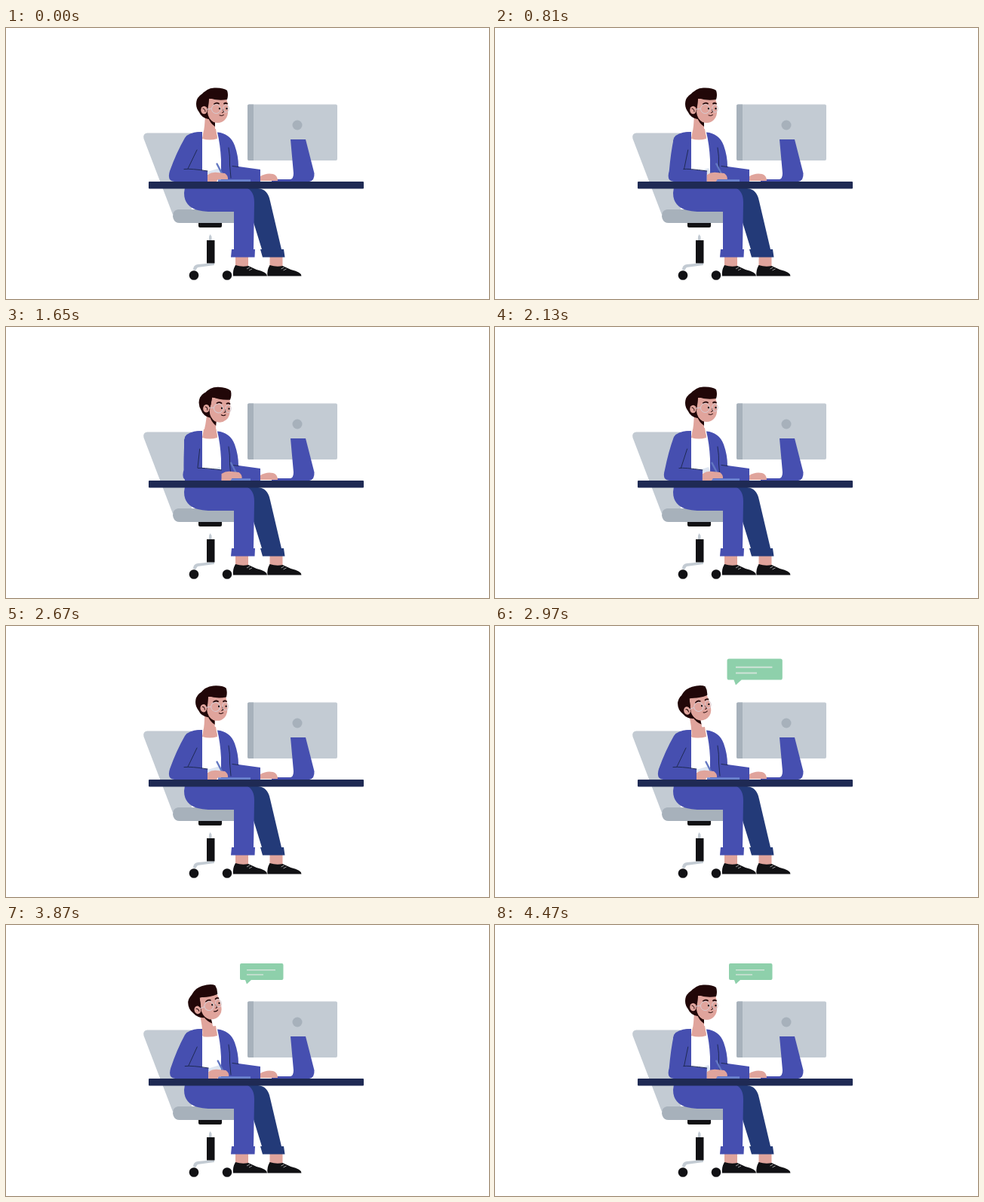
An HTML page that plays this animation: 640 px wide and 360 px high, repeating every 4500 ms.

```html
<!DOCTYPE html>
<html lang="en">
<head>
<meta charset="utf-8">
<title>Working at a desk</title>
<style>
  html, body { margin: 0; width: 100%; height: 100%; overflow: hidden; background: #fff; }
  svg { display: block; width: 100vw; height: 100vh; }
  .jacket { fill: #464fb0; }
  .navy { fill: #233a78; }
  .skin { fill: #e0a49c; }
  .hair { fill: #210708; }
  .black { fill: #111114; }
  .light { fill: #c3cbd3; }
  .grey { fill: #a7b1bb; }
  .line { fill: none; stroke: #1f2a54; stroke-width: 1; stroke-linecap: round; stroke-linejoin: round; }
  .face { fill: none; stroke: #210708; stroke-width: 1; stroke-linecap: round; }
  .frame { fill: none; stroke: #d8ccd2; stroke-width: 1; }
</style>
</head>
<body>
<svg viewBox="0 0 640 360">
  <!-- chair -->
  <path class="light" d="M187 139.5H246V243H228L221 248L182.500 147Q181 140 187 139.500Z"/>
  <path class="grey" d="M228 241H302V259H230Q222 259 221 250Q221 242 228 241Z"/>
  <path class="black" d="M255 259H286V263Q286 265 284 265H257Q255 265 255 263Z"/>
  <path class="light" d="M269 282V277L270.500 274L272.500 277V282ZM248 321Q248 315 254 314L276 312V315L254 318L251 322Z"/>
  <rect class="black" x="266" y="282" width="10.500" height="30.500"/>
  <circle class="black" cx="249" cy="328.500" r="6.300"/>
  <circle class="black" cx="293" cy="328.500" r="6.300"/>

  <!-- legs -->
  <g id="foot">
    <path class="skin" d="M304 304H321V317H304Z"/>
    <path class="black" d="M304 315Q313 318 321 316L332 321Q346 324 346 329.500H301Q300 322 304 315Z"/>
    <path d="M319 320L323 318M322 322L326 320" stroke="#fff" stroke-width=".6"/>
  </g>
  <use href="#foot" x="45.500"/>
  <path class="navy" d="M318 213H334Q347 214 350 230L365 294H368L369.500 304.500H340L337 294H339L327 255Z"/>
  <path class="jacket" d="M237 212H318Q329 216 329 232L328 294H330L329.500 304.500H298L299 294H302V244H268Q236 243 236 219Z"/>

  <!-- monitor -->
  <rect class="light" x="320" y="101.500" width="119" height="74.500" rx="2"/>
  <path class="grey" d="M322 101.500H328V176H322Q320 176 320 174V103.500Q320 101.500 322 101.500Z"/>
  <circle class="grey" cx="386" cy="129" r="6.500"/>
  <path class="jacket" d="M377 148H397L408.500 193Q409 203 402 204H352V202.500Q353 201 360 201H377Q381 200 381 193Z"/>

  <!-- torso -->
  <path fill="#fff" d="M258 140H284L288 196H258Z"/>
  <path fill="#dde5f1" d="M267 191L283 186L286 194H267Z"/>
  <path class="skin" d="M262 136L278 134L280 147Q270 150 260 147Z"/>
  <g id="head">
    <path class="skin" d="M264 116L277 122V134L280 145Q270 149 261 145L263 130Z"/>
    <path class="hair" d="M268 119L277 124V131Q270 126 268 119Z"/>
    <path class="hair" d="M268 121Q259 119 256 112Q250 104 253 95Q257 87 265 86L280 96L275 120Z"/>
    <path class="skin" d="M269 94H292Q294 99 294 107Q295 117 290 122Q284 128 275 125Q268 121 267 112Z"/>
    <path class="hair" d="M258 90Q265 80 276 79.500Q288 79 293 83Q295 89 293 95Q280 97 269 93L268 104L264 106Z"/>
    <ellipse class="skin" cx="262.500" cy="109" rx="4.300" ry="5.300"/>
    <path class="face" stroke-width=".7" d="M261 107Q264 107 264 111"/>
    <path class="face" style="stroke-width:1.800" d="M276 101Q279 98.500 282 100.500M289 100.500Q291 99 293 100.500"/>
    <path class="face" d="M287.500 108L288.500 111.500L286.500 112.500M283 116Q286 117.500 288.500 115.500"/>
    <circle class="black" cx="283" cy="107" r="1.200"/>
    <circle class="black" cx="292.500" cy="107" r="1.200"/>
    <circle class="frame" cx="278.500" cy="107.500" r="6"/>
    <ellipse class="frame" cx="291.500" cy="107" rx="3.800" ry="5"/>
    <path class="frame" d="M266 108L272.500 107"/>
  </g>
  <path class="jacket" d="M260 138V204H237L236 150Q240 139 260 138Z"/>
  <path class="jacket" d="M280 138.500Q297 140 303 156Q308 170 308 184L337 188V204H285V175Q284 155 280 138.500Z"/>
  <path class="line" d="M295 159Q297 170 296.500 182L298 199M300 183.500L308 184.500"/>
  <path class="skin" d="M337 197Q345 192 354 194Q360 196 360 203H337Z"/>
  <path fill="#6b83cf" d="M281 201.200H324V204H281Z"/>

  <!-- writing arm -->
  <path id="sleeve" class="jacket"/>
  <path id="fold" class="line"/>
  <g id="hand">
    <path d="M279.500 180.500L288 197" stroke="#6378c2" stroke-width="2.400" stroke-linecap="round"/>
    <path class="skin" d="M267 195Q273 191 280 192L290 193Q294.500 196 294 201H281L279 204H267Z"/>
  </g>

  <rect x="189" y="204" width="285" height="9.500" rx="1" fill="#1f2a54"/>

  <g id="bubble">
    <path fill="#8ed0ab" d="M312 51H365.500Q367.500 51 367.500 53V71Q367.500 73 365.500 73H325L319 78.500L317 73H312Q310 73 310 71V53Q310 51 312 51Z"/>
    <path d="M319 59.800H357M319 66H341" stroke="#cfe3d8" stroke-width="1.600"/>
  </g>
</svg>
<script>
const LOOP = 4500, REST_START = 2700, REST_END = 3660, POP = 2760;
const [head, sleeve, fold, hand, bubble] =
  ['head', 'sleeve', 'fold', 'hand', 'bubble'].map(id => document.getElementById(id));

// Cosine ease from 0 to 1 between two times
function ease(t, from, to) {
  const x = Math.min(1, Math.max(0, (t - from) / (to - from)));
  return (1 - Math.cos(Math.PI * x)) / 2;
}

// Distance the forearm has slid to the right
function armShift(t) {
  if (t > REST_START && t < REST_END) return 0;
  const phase = (t < REST_END ? t : t - REST_END) / REST_START;
  return 10.5 * (1 - Math.cos(2 * Math.PI * phase));
}

function headAngle(t) {
  const down = ease(t, 900, 1500) - ease(t, 1680, 2130);
  const up = ease(t, 2580, 3060) - ease(t, 3900, 4380);
  return 4.5 * down - 14 * up;
}

function bubbleScale(t) {
  const s = (t - POP) / 1000;
  return s <= 0 ? 0 : 1 - Math.exp(-6 * s) * Math.cos(16 * s);
}

function draw(t) {
  const d = armShift(t);
  const inner = 241 + 0.7 * d, cuff = 267 + d;
  sleeve.setAttribute('d', `M260 138Q242 138 237 146Q${226 + 0.5 * d} 165 ${217 + d} 190
    Q${213 + d} 203 ${223 + d} 204H${cuff}V190L${inner} 187L255 160Z`);
  fold.setAttribute('d', `M${253 + 0.2 * d} 162L${inner} 187M${inner - 5 + 0.3 * d} 187.500
    Q${inner + 5} 186.500 ${cuff} 190`);
  hand.setAttribute('transform', `translate(${d})`);
  head.setAttribute('transform', `rotate(${headAngle(t)} 274 146)`);
  bubble.setAttribute('transform', `translate(319 78.5) scale(${bubbleScale(t)}) translate(-319 -78.5)`);
}

function tick() {
  draw(performance.now() % LOOP);
  requestAnimationFrame(tick);
}
tick();
</script>
</body>
</html>
```
